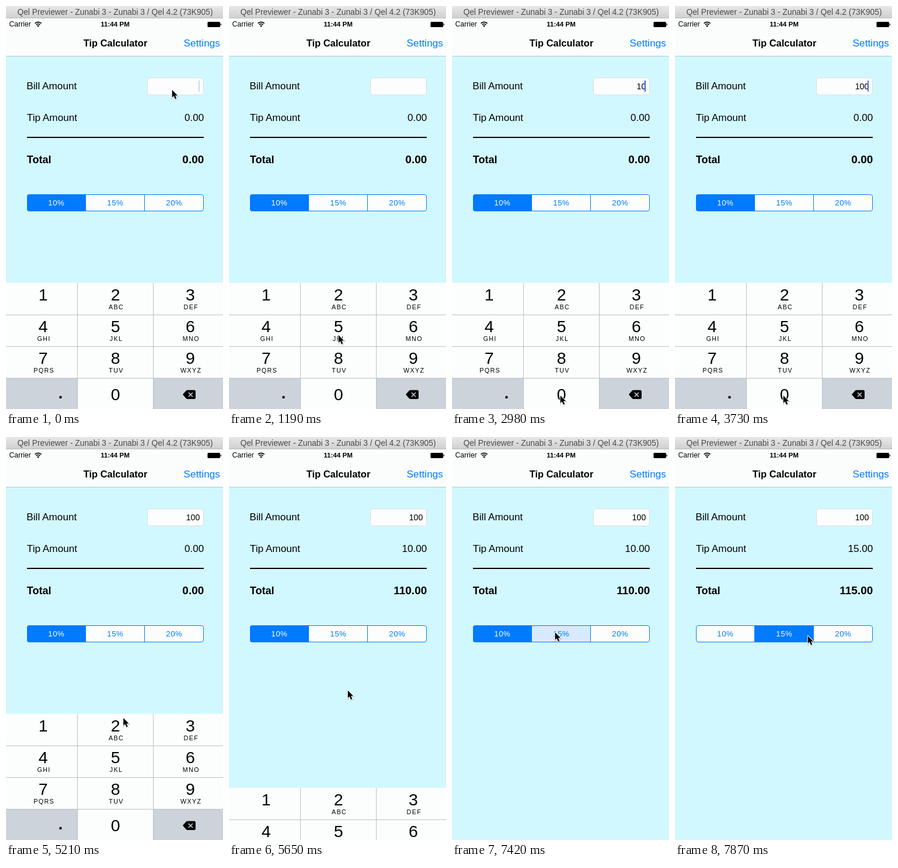
An HTML page that plays this animation: 372x687 px, repeating every 8 s.

```html
<!DOCTYPE html>
<html lang="en">
<head>
<meta charset="utf-8">
<title>Tip Calculator</title>
<style>
  html, body { margin: 0; width: 100%; height: 100%; overflow: hidden; background: #d2f8ff; }
  svg { display: block; width: 372px; height: 687px; font-family: "Liberation Sans", Arial, sans-serif; }
  rect { shape-rendering: crispEdges; }
  .round { shape-rendering: auto; }
  .end { text-anchor: end; }
  .mid { text-anchor: middle; }
  .bold { font-weight: bold; }
  .label { font-size: 17.2px; }
  .seg { font-size: 13.3px; letter-spacing: .5px; }
  .digit { font-size: 28.5px; }
  .letters { font-size: 10.8px; letter-spacing: 1.3px; }
</style>
</head>
<body>
<svg viewBox="0 0 372 687">
  <defs>
    <linearGradient id="chrome" x2="0" y2="1">
      <stop stop-color="#e8e8e8"/><stop offset="1" stop-color="#cfcfcf"/>
    </linearGradient>
    <clipPath id="pill"><rect class="round" x="36" y="321" width="303" height="29" rx="4"/></clipPath>
    <path id="arrow" d="M0 0V14.2L3.2 11.2 5.7 16.8 8.2 15.7 5.8 10.2H10.2Z"/>
  </defs>

  <rect width="372" height="687" fill="#d2f8ff"/>
  <rect y="21" width="372" height="64" fill="#fbfdfd"/>
  <rect y="85" width="372" height="1" fill="#b1c5c9"/>
  <rect width="372" height="21" fill="url(#chrome)"/>
  <rect y="20" width="372" height="1" fill="#b9b9b9"/>
  <text class="mid" x="187" y="15" font-size="13.8" fill="#4b4b4b">Qel Previewer - Zunabi 3 - Zunabi 3 / Qel 4.2 (73K905)</text>

  <text x="5.5" y="35" font-size="12.2">Carrier</text>
  <g fill="none" stroke="#000" stroke-width="1.8">
    <path d="M49.6 29.6a7.8 7.8 0 0 1 11 0M51.8 32a4.7 4.7 0 0 1 6.6 0"/>
    <path d="M55.1 36L53.2 33.8a2.7 2.7 0 0 1 3.8 0Z" fill="#000" stroke="none"/>
  </g>
  <text class="mid bold" x="187" y="35" font-size="11.6">11:44 PM</text>
  <rect class="round" x="345.5" y="27" width="21.5" height="9" rx="1.5"/>
  <path d="M368 29.8q1.6 1.7 0 3.6Z" stroke="#000" stroke-width=".6"/>

  <text class="mid bold" x="187.5" y="69" font-size="16.5">Tip Calculator</text>
  <text class="end" x="367" y="69" font-size="17.3" fill="#007aff">Settings</text>

  <text class="label" x="35.3" y="142">Bill Amount</text>
  <rect class="round" x="242.5" y="122.5" width="96" height="29" rx="4" fill="#fcfefe" stroke="#d3e0e3"/>
  <text class="end" id="bill" x="332.3" y="142" font-size="14.2"></text>
  <rect id="caret" x="330" y="127" width="2" height="19" fill="#3e66e8"/>

  <text class="label" x="35.8" y="196">Tip Amount</text>
  <text class="end" id="tip" x="339.3" y="196" font-size="17.1"></text>
  <rect x="36" y="223" width="303" height="2"/>
  <text class="bold" x="35.8" y="268" font-size="18">Total</text>
  <text class="end bold" id="total" x="339.3" y="268" font-size="19"></text>

  <g clip-path="url(#pill)">
    <rect x="36" y="321" width="303" height="29" fill="#fcfefe"/>
    <rect id="tint" x="137" y="321" width="101" height="29" fill="#d8eaff"/>
    <rect id="pick" y="321" width="101" height="29" fill="#007aff"/>
  </g>
  <rect x="136" y="321" width="1" height="29" fill="#007aff"/>
  <rect x="237" y="321" width="1" height="29" fill="#007aff"/>
  <rect class="round" x="36.5" y="321.5" width="302" height="28" rx="3.5" fill="none" stroke="#007aff"/>
  <g id="segs"></g>

  <g id="pad"></g>

  <g id="cursor">
    <g transform="translate(.7 1) scale(.92)">
      <use href="#arrow" transform="translate(.5 1.3)" opacity=".2" stroke="#000" stroke-width="2"/>
      <use href="#arrow" fill="#fff" stroke="#fff" stroke-width="2" stroke-linejoin="round"/>
      <use href="#arrow"/>
    </g>
  </g>
</svg>
<script>
const $ = id => document.getElementById(id);
const LOOP = 8000, STEP = 148.4;

function add(parent, tag, attrs, text = '') {
  const el = document.createElementNS('http://www.w3.org/2000/svg', tag);
  for (const name in attrs) el.setAttribute(name, attrs[name]);
  el.textContent = text;
  return parent.appendChild(el);
}

const segs = [10, 15, 20].map((rate, i) =>
  add($('segs'), 'text', { class: 'mid seg', x: 86.3 + 101 * i, y: 340 }, rate + '%'));

// Keypad
const WHITE = '#fcfefe', GRAY = '#ccd3db';
const cols = [[0, 122, 63.8], [123, 129, 187.7], [253, 119, 316]];
const letters = ['', 'ABC', 'DEF', 'GHI', 'JKL', 'MNO', 'PQRS', 'TUV', 'WXYZ'];
const pad = $('pad'), cells = [];
add(pad, 'rect', { y: 472, width: 372, height: 215, fill: '#b9c0c3' });
for (let i = 0; i < 12; i++) {
  const [x, width, mid] = cols[i % 3], row = Math.floor(i / 3), y = 472 + 54 * row + (row ? 1 : 0);
  const side = i === 9 || i === 11;
  const height = row < 3 ? 526 + 54 * row - y : 687 - y;
  cells.push(add(pad, 'rect', { x, y, width, height, fill: side ? GRAY : WHITE }));
  if (side) continue;
  const digit = i < 9 ? i + 1 : 0;
  add(pad, 'text', { class: 'mid digit', x: mid, y: digit ? 501.7 + 54 * row : 671.5 }, digit);
  if (digit > 1) add(pad, 'text', { class: 'mid letters', x: mid + 1.3, y: 517 + 54 * row }, letters[i]);
}
add(pad, 'text', { class: 'mid bold', x: 93.5, y: 669, 'font-size': 27 }, '.');
add(pad, 'path', { d: 'M303 662.3L309 655.6Q310 654.8 311 654.8H322.5Q325 654.8 325 657.3V667.5Q325 670 322.5 670H311Q310 670 309 669.2Z' });
add(pad, 'path', { d: 'M313 659l7 7m0-7l-7 7', stroke: GRAY, 'stroke-width': 1.5 });

// Pointer stops: step, x, y
const path = [
  [0, 284, 142], [1, 283, 146], [3, 250, 250], [5, 190, 430], [6, 163, 508], [8, 187, 560],
  [9, 182, 570], [10, 160, 575], [12, 110, 552], [14, 78, 507], [16, 78, 507], [17, 110, 570],
  [18, 160, 640], [19, 185, 663], [31, 185, 663], [32, 186, 645], [34, 198, 525], [36, 203, 431],
  [42, 203, 431], [43, 183, 361], [45, 176, 342], [46, 174, 334], [47, 176, 332],
  [51, 176, 332], [52, 200, 336], [53, 227, 338]
];

function pointer(k) {
  const i = path.findIndex(p => p[0] >= k), b = path[i], a = path[i - 1] || b;
  const u = b === a ? 0 : (k - a[0]) / (b[0] - a[0]);
  return [a[1] + (b[1] - a[1]) * u, a[2] + (b[2] - a[2]) * u];
}

function caretAlpha(k) {
  if (k >= 38) return 0;
  if (k >= 15 && k < 25) return 1;
  const phase = (k < 15 ? k : k - 25) % 7;
  if (phase === 0) return k < 15 ? .25 : .85;
  return phase < 4 ? 0 : 1;
}

function draw(now) {
  const k = Math.min(53, Math.floor(now % LOOP / STEP));
  const done = k >= 38, second = k >= 51;
  const rate = done ? (second ? 15 : 10) : 0;

  $('bill').textContent = k < 15 ? '' : k < 19 ? '1' : k < 21 ? '10' : '100';
  $('tip').textContent = rate.toFixed(2);
  $('total').textContent = (done ? 100 + rate : 0).toFixed(2);
  $('caret').setAttribute('opacity', caretAlpha(k));

  $('pick').setAttribute('x', second ? 137 : 36);
  $('tint').setAttribute('opacity', k === 50 ? 1 : 0);
  segs.forEach((s, i) => s.setAttribute('fill', i === +second ? '#fff' : '#007aff'));

  cells[0].setAttribute('fill', k === 15 ? GRAY : WHITE);
  cells[10].setAttribute('fill', k === 19 || k === 21 ? GRAY : WHITE);
  const drop = k < 38 ? 0 : k === 38 ? 126 : k === 39 ? 204 : 216;
  pad.setAttribute('transform', `translate(0 ${drop})`);

  $('cursor').setAttribute('transform', `translate(${pointer(k)})`);
}

const start = performance.now();
(function tick() {
  draw(performance.now() - start);
  requestAnimationFrame(tick);
})();
</script>
</body>
</html>
```
